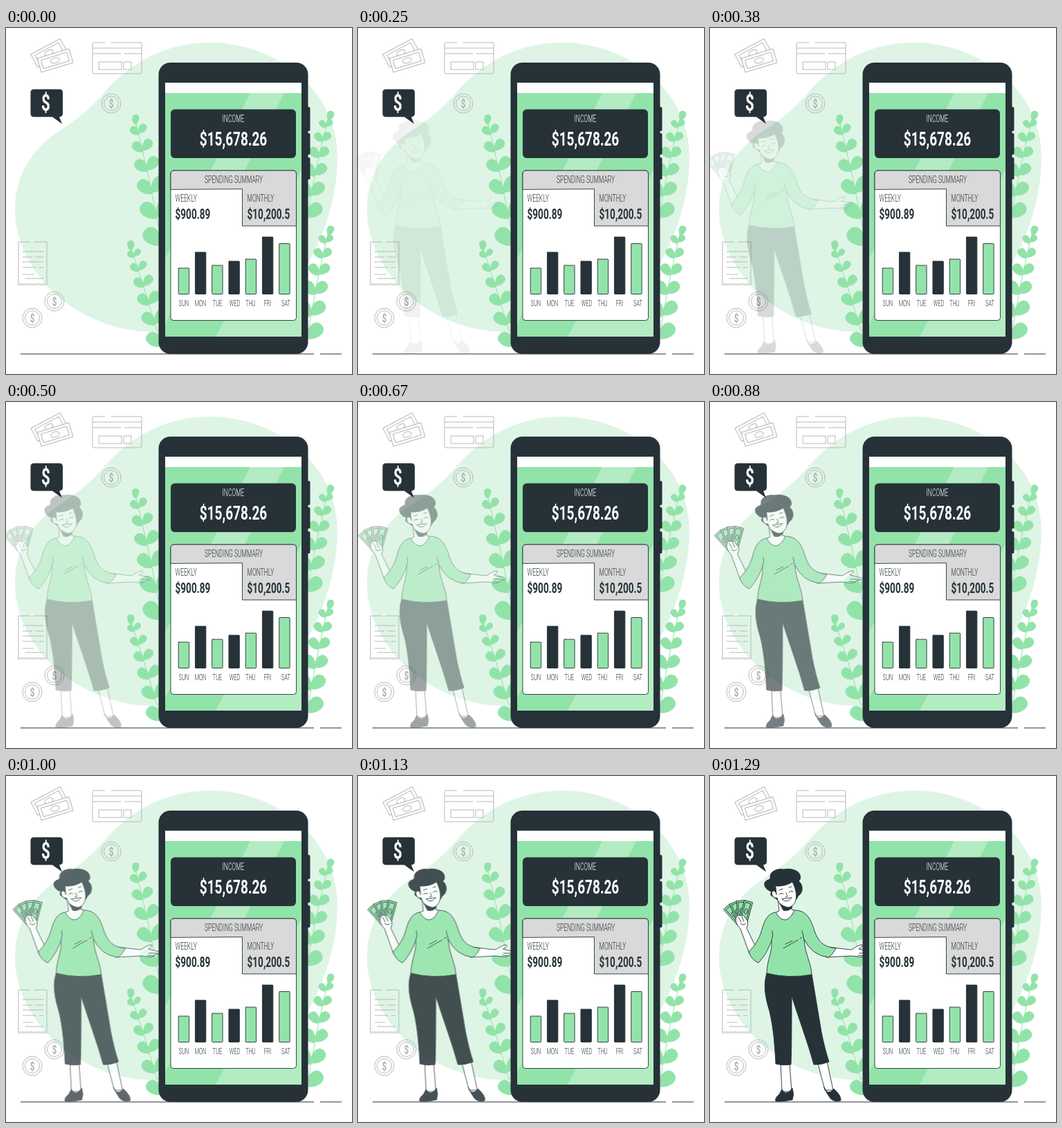
An HTML page that plays this animation: 500x500 px, repeating every 1330 ms.

```html
<!DOCTYPE html>
<html lang="en">
<head>
<meta charset="utf-8">
<title>Spending summary</title>
<style>
  html, body { margin: 0; width: 100%; height: 100%; overflow: hidden; background: #fff; }
  svg { display: block; width: 100%; height: 100%; }
  text { font-family: Roboto, "Liberation Sans", sans-serif; font-weight: 300; }
  .bold { font-weight: 700; }
  .props { fill: none; stroke: #b0b0b0; stroke-width: .9; }
  .props text { fill: #b0b0b0; stroke: none; }
  .ink { stroke: #263238; stroke-width: .9; stroke-linejoin: round; stroke-linecap: round; }
</style>
</head>
<body>
<svg id="stage" viewBox="0 0 500 500"></svg>
<script>
const DARK = '#263238', GREEN = '#92e3a9', GREY = '#d9d9d9';
const range = n => [...Array(n).keys()];

// Condensed lettering: one ratio per weight
const text = (x, y, size, str, { bold = false, fill = DARK, anchor = 'middle' } = {}) =>
  `<text class="${bold ? 'bold' : ''}" font-size="${size}" fill="${fill}" text-anchor="${anchor}"
    transform="translate(${x} ${y}) scale(${bold ? .68 : .61} 1)">${str}</text>`;

const leaf = (x, y, angle, size) =>
  `<path d="M0 0C.3-.42 1-.5 1 0S.3.42 0 0" transform="translate(${x} ${y}) rotate(${angle}) scale(${size})"/>`;

// Stem running down from its tip; leaf pairs grow larger and further apart towards the base
function plant(x, y, dx, dy, bend) {
  const lean = dx > 0 ? 0 : 12;
  const leaves = range(6).map(i => {
    const s = .12 + .13 * i + .01 * i * i;
    const px = x + 2 * s * (1 - s) * bend + s * s * dx + s * (1 - s) * dx, py = y + s * dy;
    const size = dy * (.09 + .02 * i);
    return leaf(px, py, lean - 137, size) + leaf(px, py - 2, lean - 55, size);
  }).join('');
  return `<path d="M${x} ${y}q${dx / 2 + bend} ${dy / 2} ${dx} ${dy}" fill="none" stroke="${GREEN}"/>
    <g fill="${GREEN}">${leaf(x, y + 7, dx > 0 ? -88 : -72, 15)}${leaves}</g>`;
}

const coin = (x, y) => `<circle cx="${x}" cy="${y}" r="14"/><circle cx="${x}" cy="${y}" r="10.5"/>` +
  text(x, y + 6, 17, '$', { bold: true, fill: '#b0b0b0' });

const note = (x, y, angle) => `<g transform="translate(${x} ${y}) rotate(${angle})">
  <rect x="-24" y="-10.5" width="48" height="21" fill="#fff"/>
  <rect x="-19.5" y="-6.5" width="39" height="13"/><ellipse rx="6.5" ry="3.8"/></g>`;

const props = `<g class="props">
  ${note(62, 36, -28)}${note(71, 47, -17)}
  <path d="M143 21H127q-2 0-2 2V64q0 2 2 2H194q2 0 2-2V23q0-2-2-2H152M125 29H196M125 37H166M171 37H196
    M134 49h33v11h-33zM170 49h11v11h-11z"/>
  ${coin(152, 109)}
  <path d="M35 309H18V372${'l2 -3l2 3'.repeat(10)}l1-2V309H40
    M24 323H54M24 331H38M42 331H54M24 338H54M24 346H44M48 346H54M24 356H40M28 362H54"/>
  ${coin(70, 395)}${coin(38, 419)}
</g>`;

const bill = angle => `<g transform="translate(47 214) rotate(${angle})" fill="${GREEN}">
  <rect x="-6" y="-34" width="12" height="31"/><rect x="-3.8" y="-31.5" width="7.6" height="26"/>
  <ellipse cy="-19" rx="2.2" ry="4"/></g>`;

const woman = `<g id="woman" class="ink" fill="#fff">
  <path d="M102 415L104 456L118 456L115 415ZM155 412L166 454L178 454L169 412Z"/>
  <path fill="${DARK}" d="M104 453Q110 464 119 451Q122 460 119 468Q105 471 95 470Q93 466 100 460Z
    M165 450Q170 463 179 452Q190 462 189 469Q180 472 174 466Q168 458 165 450Z"/>
  <path fill="${DARK}" d="M82 285Q115 293 147 286C151 310 156 340 161 370Q166 395 172 413Q160 418 150 417
    C141 384 128 350 118 318C118 350 118 390 117 417Q105 419 95 416C94 395 92 365 86 340C79 318 77 300 82 285Z"/>
  ${[-42, -23, -4, 15].map(bill).join('')}
  <path d="M57 257L44 221C38 214 36 209 38 204Q41 199 45 202Q49 200 50 204L54 209Q56 214 53 220L67 249Z"/>
  <path fill="none" d="M41 204L45 211M46 203L49 210M44 213Q48 217 52 213"/>
  <path d="M170 247L203 251C208 250 213 244 220 244Q222 246 215 250L231 254Q234 257 225 258Q221 263 213 261L204 260L168 262Z"/>
  <path fill="none" d="M216 256L229 256M214 259L223 260"/>
  <path fill="${GREEN}" d="M94 197C84 199 79 207 75 222C71 236 65 245 56 254Q60 266 70 270C79 260 84 251 89 238
    C91 252 82 267 82 285Q113 293 147 287C147 272 137 257 136 236Q147 259 171 262Q176 260 182 249
    C164 247 157 240 151 224C145 203 137 194 122 194L108 203Z"/>
  <path fill="none" d="M89 238Q92 230 90 224M136 237Q135 230 133 224M106 249L127 237M109 243L119 238M130 235L133 233"/>
  <path d="M98 178L100 195L95 197Q101 208 109 208Q117 206 122 194L118 193L118 180Z"/>
  <path fill="${DARK}" d="M101 184L119 185L118 191Q112 196 106 194Z"/>
  <path fill="${DARK}" d="M89 167C80 165 75 155 82 151Q88 149 87 146C86 138 98 133 106 135C113 133 128 135 130 143
    Q132 149 128 152C134 156 135 166 130 171Q127 173 125 178L121 182L97 179L92 175Q85 172 89 167Z"/>
  <path d="M95 159Q109 160 119 153C123 161 126 171 124 179Q121 189 113 190C103 188 98 182 97 176
    C91 178 87 169 91 166Q95 166 96 171Z"/>
  <path fill="none" d="M100 171Q103 168 106 170M114 168Q117 165 120 167M100 165L105 163M114 161L118 160
    M110 169L112 174L109 175M104 178Q111 185 118 176Z"/>
</g>`;

const bars = [37.5, 60.5, 41.5, 47.5, 50.5, 82.5, 73].map((h, i) =>
  `<rect x="${249.2 + 24.25 * i}" y="${384.5 - h}" width="15.4" height="${h}" rx=".8" fill="${i % 2 ? DARK : GREEN}"/>`).join('');
const dayX = [257, 281, 305.5, 330.5, 353.5, 378, 404.5];
const days = 'SUN MON TUE WED THU FRI SAT'.split(' ').map((d, i) => text(dayX[i], 402, 12, d)).join('');
const start = { anchor: 'start' }, startBold = { anchor: 'start', bold: true };

const phone = `<g fill="${DARK}">
    <rect x="430" y="114" width="9.5" height="35" rx="2"/><rect x="430" y="152" width="9.5" height="31" rx="2"/>
    <rect x="430" y="187" width="9.5" height="32" rx="2"/><rect x="220.5" y="50" width="216" height="421" rx="17"/></g>
  <path fill="#fff" d="M230 79H427V94H230Z"/><path fill="${GREEN}" d="M230 94H427V446H230Z"/>
  <path fill="#fff" opacity=".3" d="M353 94H402L230 428V333ZM427 205V446H303Z"/>
  <rect x="238" y="117.5" width="181" height="70.5" rx="6" fill="${DARK}"/>
  ${text(328.5, 136, 14, 'INCOME', { fill: '#fff' })}
  ${text(328.5, 170, 28, '$15,678.26', { bold: true, fill: '#fff' })}
  <g class="ink">
    <rect x="238" y="206" width="181.5" height="216.5" rx="4" fill="#fff"/>
    <path fill="${GREY}" d="M238 233V211Q238 206 243 206H414.5Q419.5 206 419.5 211V286H341.5V233Z"/>
    ${bars}
  </g>
  ${text(329, 223.5, 14, 'SPENDING SUMMARY')}
  ${text(244.5, 251, 14, 'WEEKLY', start)}${text(348.5, 251, 14, 'MONTHLY', start)}
  ${text(244.5, 276, 20, '$900.89', startBold)}${text(348.5, 276, 20, '$10,200.5', startBold)}
  ${days}`;

document.getElementById('stage').innerHTML = `
  <path fill="#def5e5" d="M13 262C13 215 36 177 72 152C100 133 119 120 138 98C170 60 220 21 295 21
    C390 21 479 90 479 185C479 280 430 360 400 390C340 430 270 440 200 439C90 430 13 345 13 262Z"/>
  ${plant(187, 133, 38, 178, 3)}${plant(180, 315, 44, 143, 2)}
  ${plant(466, 127, -31, 146, -3)}${plant(466, 293, -31, 155, -3)}
  <path stroke="${DARK}" stroke-width="1.2" d="M21 471H445M454 471H485"/>
  ${props}${woman}${phone}
  <path fill="${DARK}" d="M40.5 88.5H77Q82 88.5 82 93.5V123.5Q82 128 77 128.5L81 138.5L67 128.5H40.5Q35.5 128.5 35.5 123.5V93.5Q35.5 88.5 40.5 88.5Z"/>
  ${text(57.5, 118.5, 33, '$', { bold: true, fill: '#fff' })}`;

const LOOP = 1330, FIRST = 6, LAST = 31;
const figure = document.getElementById('woman');

// The woman fades in while gliding right, stepped at 24 per second
function draw(time) {
  const step = Math.floor(time % LOOP * .024 + .1);
  const p = (step - FIRST) / (LAST - FIRST);
  const shift = -28 * (1 - p * (.7 + .3 * p));
  figure.setAttribute('opacity', step < FIRST ? 0 : .07 + .93 * p);
  figure.setAttribute('transform', `translate(${shift} 0)`);
}

const origin = performance.now();
function tick() {
  draw(performance.now() - origin);
  requestAnimationFrame(tick);
}
tick();
</script>
</body>
</html>
```
